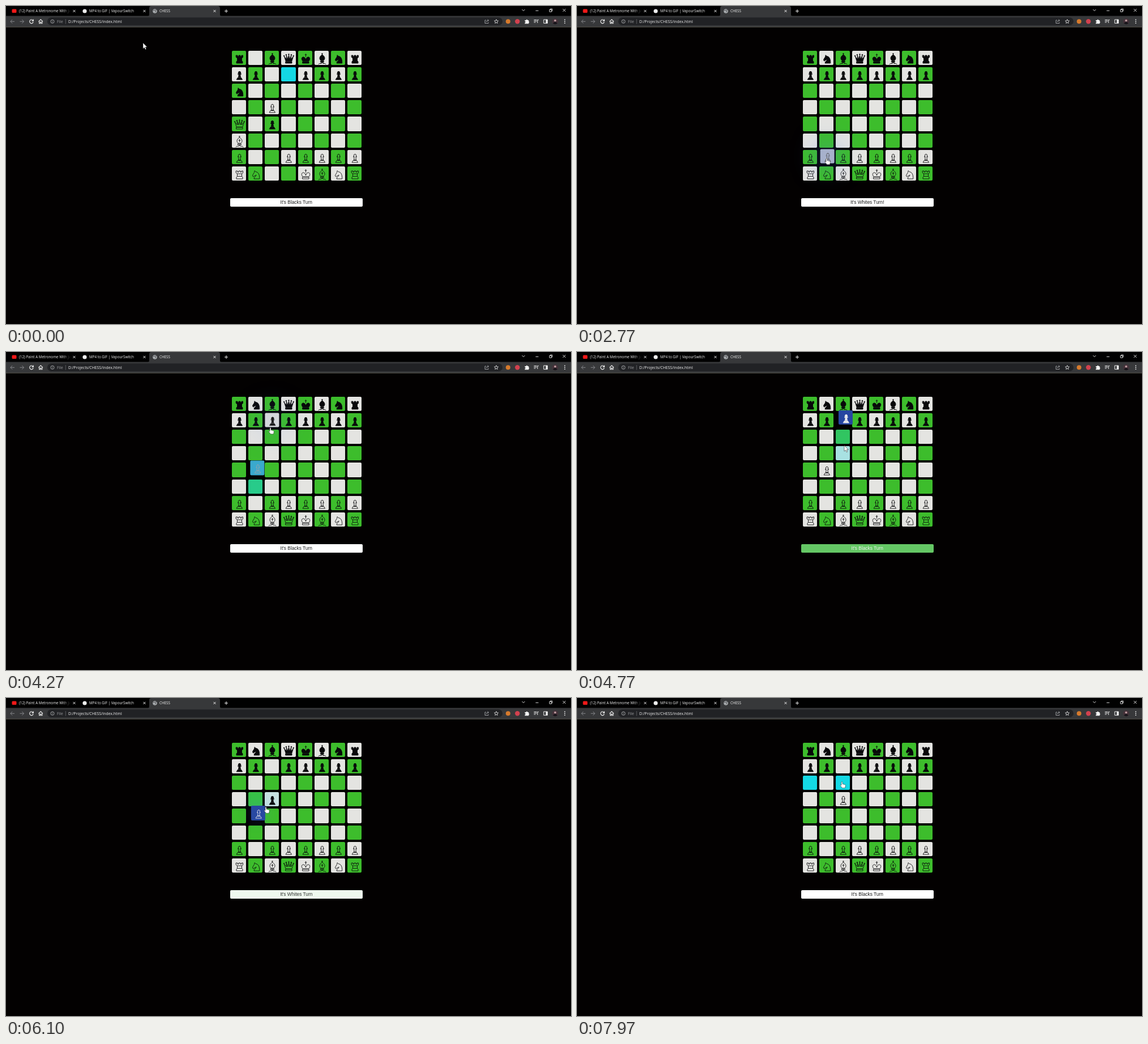
Animation, 998 px wide and 561 px high, one loop 8000 ms. Source, as an HTML page:

```html
<!DOCTYPE html>
<html lang="en">
<head>
<meta charset="utf-8">
<title>CHESS</title>
<style>
  html, body { margin: 0; width: 100%; height: 100%; overflow: hidden; background: #030101; }
  svg { position: absolute; left: 0; top: 0; overflow: visible; }
  #chrome text { font-family: "Open Sans", "Noto Sans", sans-serif; font-size: 6.3px; fill: #f2f2f2; }
  .line { fill: none; stroke: #eee; stroke-width: 1; }
  .dim { stroke: #85868a; }
  .cell { position: absolute; width: 25.2px; height: 25.2px; border-radius: 2px; }
  .cell path { stroke: currentColor; stroke-width: .85; stroke-linejoin: round; stroke-linecap: round; }
  #status {
    position: absolute; left: 396px; top: 339.4px; width: 233.5px; height: 14.2px; border-radius: 2px;
    font: 8.35px/14.2px "Liberation Sans", Arial, sans-serif; text-align: center; white-space: nowrap;
  }
  #cursor { z-index: 50; }
</style>
</head>
<body>
<svg id="chrome" width="998" height="561" viewBox="0 0 998 561">
  <defs>
    <linearGradient id="fade" gradientUnits="userSpaceOnUse" x1="100" x2="114" y1="0" y2="0">
      <stop stop-color="#f2f2f2"/><stop offset="1" stop-color="#f2f2f2" stop-opacity="0"/>
    </linearGradient>
  </defs>
  <rect width="998" height="18" fill="#010101"/>
  <rect y="17.5" width="998" height="19.5" fill="#37383a"/>
  <path d="M250 18q3 0 3-3V4q0-4 4-4h117q4 0 4 4v11q0 3 3 3z" fill="#37383a"/>
  <rect y="36.6" width="998" height="1" fill="#58564f"/>
  <rect x="73" y="20.3" width="804" height="13.8" rx="6.9" fill="#212225"/>

  <rect x="10.5" y="5.5" width="8" height="6.6" rx="1.5" fill="#f01818"/>
  <circle cx="139" cy="9" r="3.6" fill="#eee"/>
  <circle cx="263" cy="9" r="3.8" fill="#a8abae"/>
  <path d="M260 8l3-1 2 2-2 2M264 6l2 1" class="line" style="stroke:#454648"/>
  <text x="23" y="11.2" style="fill:url(#fade)">(12) Paint A Metronome With Jav</text>
  <text x="147" y="11.2">MP4 to GIF | VapourSwitch</text>
  <text x="271" y="11.2">CHESS</text>
  <path class="line" d="M118.5 6.9l4 4m0-4l-4 4M242.5 6.9l4 4m0-4l-4 4M366.5 6.9l4 4m0-4l-4 4M386 9h6m-3-3v6"/>
  <path class="line" d="M911.5 6l2.5 2.6 2.5-2.6M935.5 8.3h5M960 6.5h3.7v3.7h-3.7zM961.2 6.3v-1.2h3.7v3.7h-1.1M983.5 5l5 5m0-5l-5 5" style="stroke-width:.9"/>

  <path class="line dim" d="M15 27.3h-7m3.2-3.3l-3.3 3.3 3.3 3.3M24.5 27.3h7m-3.2-3.3l3.3 3.3-3.3 3.3"/>
  <circle id="reloadHover" cx="45" cy="27.3" r="7.2" fill="#606164"/>
  <path class="line" d="M47.7 25.3a3.3 3.3 0 1 0 .5 3M48.3 23.5v2.8h-2.9" style="stroke-width:1.2"/>
  <path class="line" d="M57.5 27.4l3.8-3.6 3.8 3.6M58.7 26.8v4h1.8v-2.6h1.6v2.6h1.8v-4" style="stroke-width:1.1"/>
  <circle class="line" cx="82" cy="27.3" r="3.1" style="stroke:#b8b9bc;stroke-width:.8"/>
  <path class="line" d="M82 26.9v2M82 25.3v.8" style="stroke:#b8b9bc;stroke-width:.8"/>
  <text x="90" y="29.7" style="font-size:6.8px;fill:#999a9d">File</text>
  <rect x="104.8" y="23" width=".8" height="8.6" fill="#66676a"/>
  <text x="110" y="29.7" style="font-size:6.87px">D:/Projects/CHESS/index.html</text>

  <path class="line" d="M848 25h-2v5.5h6v-2M848 28.4q.5-3 4.3-3M850.5 23.5l2 1.9-2 1.9" style="stroke:#b8b9bc;stroke-width:.8"/>
  <path class="line" d="M866 23.6l1 2.4 2.6.2-2 1.7.6 2.6-2.2-1.4-2.2 1.4.6-2.6-2-1.7 2.6-.2z" style="stroke-width:.8"/>
  <circle cx="886.8" cy="27.2" r="4" fill="#d77a2c"/>
  <circle cx="903.3" cy="27.2" r="4.2" fill="#d2414e"/>
  <path d="M916.5 25h2.2a1.3 1.3 0 0 1 2.6 0h2v2.2a1.3 1.3 0 0 1 0 2.5v1.6h-6.8v-2a1.2 1.2 0 0 0 0-2.4z" fill="#f2f2f2"/>
  <path class="line" d="M932.5 24.5h5M932.5 26.7h5M932.5 28.9h3M938.8 30v-5.5h2"/>
  <path class="line" d="M949.8 24h6.6v6.4h-6.6z"/><rect x="953.5" y="24" width="3" height="6.4" fill="#eee"/>
  <circle cx="970" cy="27.2" r="5.4" fill="#45323a"/>
  <circle cx="970" cy="25.6" r="1.9" fill="#bd9b9e"/><path d="M966 30.4q4-5 8 0-4 3.6-8 0z" fill="#17151a"/>
  <g fill="#eee"><circle cx="987" cy="24.2" r=".9"/><circle cx="987" cy="27.2" r=".9"/><circle cx="987" cy="30.2" r=".9"/></g>
</svg>
<div id="status"></div>
<svg id="cursor" width="14" height="16">
  <path id="arrow" d="M0 0v10.4l2.4-2.2 1.7 3.7 1.7-.8-1.6-3.5h3.2z" fill="#fff" stroke="#111" stroke-width=".5"/>
  <path id="hand" d="M-1 1.2q1-1.6 2 0v3.5l4.3 1q1.2.4 1 1.8l-.8 4.2h-5l-3.6-4.5q.6-1.3 2.1-.2z" fill="#fff" stroke="#222" stroke-width=".5"/>
</svg>
<script>
const LOOP = 8000, PITCH = 29.13, LEFT = 399, TOP = 78.9, SIZE = 25.2;
const GREEN = [61, 189, 44], WHITE = [228, 228, 225], CYAN = [20, 216, 228], BLUE = [36, 68, 160];
const RELOAD = 1250;

const clamp = v => Math.max(0, Math.min(1, v));
const smooth = v => (v = clamp(v), v * v * (3 - 2 * v));
const mix = (a, b, k) => a.map((v, i) => v + (b[i] - v) * k);
const rgb = c => `rgb(${c.map(Math.round)})`;
const byId = id => document.getElementById(id);

const ball = (x, y) => `M${x - .8} ${y}a.8.8 0 1 0 1.6 0a.8.8 0 1 0-1.6 0`;
const shapes = {
  p: "M13.5 7.5a2 2 0 0 1 1.3 3.7l2 .8-2 1 .7 4.5h-4l.7-4.5-2-1 2-.8a2 2 0 0 1 1.3-3.7zM10.5 18.5h6l2 3.5h-10z",
  r: "M7.5 8h2.5v2h2v-2h3v2h2v-2h2.5v3.5l-2 1.5v4.5l1.5 1.5v3h-11v-3l1.5-1.5v-4.5l-2-1.5zM9.5 13h8M9.5 17.5h8",
  n: "M7.5 16.5c.4-3.2 2.5-4 3-6l.7-3 1.8 2c5 .5 7 5 6.7 12.5h-9.7c0-4 4-4 4-7-2 2-3.8 1-4.6 3z",
  b: ball(13.5, 5.3) + "M13.5 6.8c-3 2-4.5 4-4.5 6.4 0 1.6 1 3 2 4h5c1-1 2-2.4 2-4 0-2.4-1.5-4.4-4.5-6.4zM10.8 18h5.4v2h-5.4zM13.5 20q-.6 3-3 2.4t-3.5 1.4M13.5 20q.6 3 3 2.4t3.5 1.4M13.5 10.5v4M12 12h3",
  q: "M8 18l-2.5-8 4.4 5-.9-7.3 3 7 1.5-7.5 1.5 7.5 3-7-.9 7.3 4.4-5-2.5 8zM8 19h11v3h-11z" +
     [[5.2, 9], [9, 7], [13.5, 6.3], [18, 7], [21.8, 9]].map(p => ball(...p)).join(""),
  k: "M13.5 5.5v5M12 7h3M8 18c-3-3-2-7.5 1.5-7 2 .2 3.5 2 4 5 .5-3 2-4.8 4-5 3.5-.5 4.5 4 1.5 7zM8 19h11v3h-11z"
};

const HOME = "rnbqkbnr/pppppppp/8/8/8/8/PPPPPPPP/RNBQKBNR";
const positions = [
  [0, "r1bqkbnr/pp2pppp/n7/2P5/Q1p5/B7/P2PPPPP/RN2KBNR", "It's Blacks Turn"],
  [RELOAD, HOME, "It's Whites Turn!"],
  [4050, "rnbqkbnr/pppppppp/8/8/1P6/8/P1PPPPPP/RNBQKBNR", "It's Blacks Turn"],
  [5050, "rnbqkbnr/pp1ppppp/8/2p5/1P6/8/P1PPPPPP/RNBQKBNR", "It's Whites Turn"],
  [6715, "rnbqkbnr/pp1ppppp/8/2P5/8/8/P1PPPPPP/RNBQKBNR", "It's Blacks Turn"]
];

// squares, start, end, fade-out time
const lights = [
  ["d7", -900, RELOAD, 1], ["b3 b4", 2980, 4050, 450], ["c6 c5", 4670, 5050, 450],
  ["b5 c5", 6050, 6715, 450], ["a6 c6", 7300, 9900, 450]
];

// square, enter, leave, tint strength
const hovers = [
  ["b2", 2620, 3020, 1], ["b5", 3150, 3700, 1], ["b4", 3710, 4100, 1], ["c7", 4200, 4740, 1],
  ["c5", 4800, 5180, 1], ["b4", 5700, 6060, 1], ["c5", 6200, 6820, 0], ["b8", 6850, 7380, 1]
];

const path = [
  [0, 242, 65], [900, 46, 27], [1250, 46, 27], [1670, 89, 46], [2750, 441, 268], [2980, 441, 268],
  [3300, 442, 178], [3730, 443, 202], [4050, 443, 206], [4350, 472, 118], [4650, 472, 120],
  [4770, 472, 164.8], [4900, 472, 178], [5080, 472, 178], [5650, 444, 206], [6000, 446, 207],
  [6100, 459, 191.5], [6300, 468, 180], [6715, 468, 180], [6940, 453.5, 93], [7100, 443, 92],
  [7330, 442, 92], [7970, 468, 147]
];

const cells = [];
for (let i = 0; i < 64; i++) {
  const col = i % 8, row = i >> 3, el = document.createElement("div");
  el.className = "cell";
  el.style.left = LEFT + col * PITCH + "px";
  el.style.top = TOP + row * PITCH + "px";
  document.body.append(el);
  cells.push({ el, name: "abcdefgh"[col] + (8 - row), base: (col + row) % 2 ? WHITE : GREEN });
}

function pieceSvg(piece) {
  const kind = shapes[piece.toLowerCase()];
  if (!kind) return "";
  const solid = piece === piece.toLowerCase();
  return `<svg width="25" height="25"><path d="${kind}" fill="${solid ? "currentColor" : "none"}"/></svg>`;
}

let shown;
function setBoard(fen) {
  if (fen === shown) return;
  shown = fen;
  const squares = fen.replace(/\//g, "").replace(/\d/g, n => ".".repeat(n));
  cells.forEach((cell, i) => cell.el.innerHTML = pieceSvg(squares[i]));
}

function lightAt(name, t) {
  return Math.max(0, ...lights.filter(l => l[0].includes(name)).map(([, on, off, fade]) =>
    t < off ? clamp((t - on) / 350) : 1 - clamp((t - off) / fade)));
}

function hoverAt(name, t) {
  const state = { lift: 0, tint: 0, glow: 0, spread: 0 };
  for (const [square, enter, leave, strength] of hovers) {
    if (square !== name || t < enter) continue;
    const lift = smooth((t - enter) / 400) * (1 - smooth((t - leave) / 450));
    if (lift <= state.lift) continue;
    const age = clamp((t - enter) / 550);
    Object.assign(state, { lift, tint: lift * strength, glow: clamp(age * 4) * (1 - age), spread: 1 - age });
  }
  return state;
}

function drawCell({ el, name, base }, t) {
  const h = hoverAt(name, t);
  const color = mix(mix(base, BLUE, h.tint), CYAN, lightAt(name, t));
  const s = el.style;
  s.background = rgb(color);
  s.color = rgb(mix([8, 8, 10], [235, 235, 240], h.lift));
  s.transform = `translate(${5 * h.lift}px, ${-5 * h.lift}px)`;
  s.zIndex = Math.ceil(h.lift * 10);
  s.boxShadow = h.glow > .01 ? `0 0 ${8 + 52 * h.spread}px ${4 * h.spread}px rgba(70,125,255,${.75 * h.glow})` : "none";
}

function drawStatus(since, text) {
  const flash = smooth((since - 250) / 350) * (1 - smooth((since - 650) / 500));
  const el = byId("status");
  el.textContent = text;
  el.style.background = rgb(mix([255, 255, 255], [92, 196, 92], flash));
  el.style.color = rgb(mix([25, 25, 25], [255, 255, 255], flash));
}

function drawCursor(t) {
  const i = Math.max(1, path.findIndex(p => p[0] > t));
  const next = t >= path.at(-1)[0] ? path.length - 1 : i;
  const a = path[next - 1], b = path[next];
  const [, x, y] = mix(a, b, smooth((t - a[0]) / (b[0] - a[0])));
  const inCell = (v, start) => {
    const d = v - start + 1;
    return d >= 0 && d < 8 * PITCH && d % PITCH <= SIZE + 2;
  };
  const over = inCell(x, LEFT) && inCell(y, TOP);
  byId("cursor").style.transform = `translate(${x}px, ${y}px)`;
  byId("hand").style.display = over ? "" : "none";
  byId("arrow").style.display = over ? "none" : "";
}

function draw(now) {
  const t = now % LOOP;
  const [start, fen, text] = positions.filter(p => p[0] <= t).pop();
  setBoard(fen);
  cells.forEach(cell => drawCell(cell, t));
  drawStatus(start > RELOAD ? t - start : 0, text);
  byId("reloadHover").style.opacity = smooth((t - 820) / 100) * (1 - smooth((t - 1600) / 200));
  drawCursor(t);
}

const began = performance.now();
function tick() {
  draw(performance.now() - began);
  requestAnimationFrame(tick);
}
tick();
</script>
</body>
</html>
```
